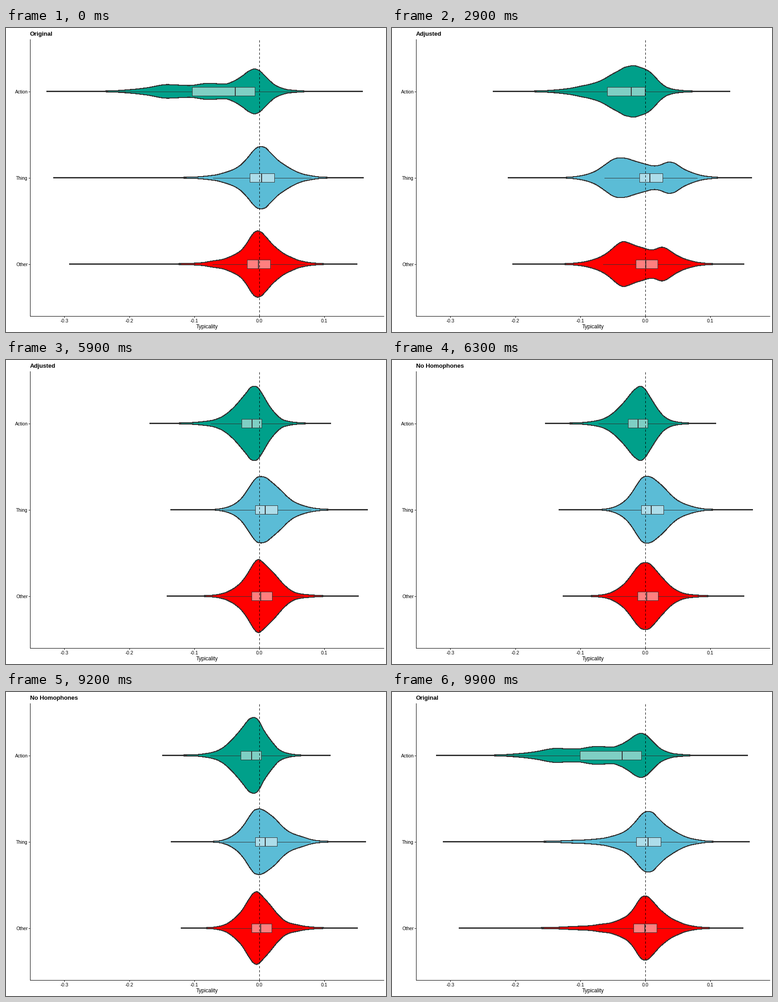
A matplotlib script that plays this animation: 837x669 px, repeating every 10000 ms.

```python
import numpy as np
import matplotlib.pyplot as plt
from matplotlib.animation import FuncAnimation
from matplotlib.patches import Polygon, Rectangle

W, H, DPI = 837, 669, 64           # a power of two keeps the pixel size exact
PX = 72 / DPI                      # one pixel in points
FRAMES, STEP_MS = 100, 100
MORPH = 9                          # steps per transition
ZERO = 557.5                       # x pixel of typicality 0
UNIT = 1432                        # pixels per unit of typicality
LEFT, RIGHT, TOP, BOTTOM = 53, 832, 24, 633
GREY = "#333333"

GROUPS = [("Action", 139, "#00A08A"), ("Thing", 329, "#5BBCD6"), ("Other", 519, "#FF0000")]
TITLES = ["Original", "Adjusted", "No Homophones"]

# Per group: (q1, median, q3) and knots (x, half width) of the density, in pixels
ORIGINAL = [
    ((410, 505, 548),
     [(89, 0), (180, .4), (230, 1.2), (280, 4.5), (310, 8), (355, 15), (403, 13), (443, 17.5),
      (483, 16.5), (500, 22), (520, 34), (535, 45), (547, 49.5), (557, 46), (570, 34),
      (580, 24), (592, 14), (605, 8), (622, 3.5), (672, .5), (785, 0)]),
    ((537, 563, 591),
     [(104, 0), (342, .5), (405, 1.2), (457, 5.5), (480, 11), (500, 18), (515, 27), (530, 42),
      (548, 63), (555, 67.5), (562, 68.5), (571, 66), (580, 57), (600, 37.5),
      (615, 27), (630, 18), (645, 11), (660, 6.5), (697, 1.3), (730, .5), (787, 0)]),
    ((531, 556, 582),
     [(139, 0), (345, .5), (400, 1.4), (430, 3), (455, 7), (475, 10), (490, 15), (512, 26),
      (520, 33), (530, 46), (540, 62), (547, 70), (554, 73), (562, 70), (570, 62), (590, 40),
      (615, 21), (630, 14), (645, 8), (675, 2.5), (704, .8), (773, 0)]),
]
ADJUSTED = [
    ((518, 541, 563),
     [(315, 0), (355, .5), (400, 1.5), (450, 6), (470, 12), (485, 21), (500, 34),
      (522, 59), (530, 69), (537, 78), (543, 81.5), (549, 82), (555, 78), (562, 68),
      (580, 38), (590, 25), (600, 14.5), (612, 7), (640, 2), (674, .5), (715, 0)]),
    ((549, 571, 598),
     [(362, 0), (452, .5), (470, 2), (485, 5), (500, 11), (515, 22), (525, 34), (535, 49),
      (550, 69), (556, 72.5), (562, 73), (572, 70.5), (582, 63), (607, 41),
      (620, 28), (635, 17), (650, 10.5), (675, 4), (700, 1.3), (730, .5), (796, 0)]),
    ((540, 561, 586),
     [(353, 0), (400, .5), (440, 1), (460, 2.5), (480, 6.5), (495, 13), (510, 23), (520, 33),
      (530, 47), (545, 72), (551, 79), (556, 81), (562, 77), (580, 60), (590, 50),
      (612, 25), (625, 14), (637, 7.5), (655, 4), (704, .8), (776, 0)]),
]
NO_HOMOPHONES = [
    ((520, 542, 562),
     [(352, 0), (366, .5), (420, 1.4), (445, 4), (465, 8.5), (480, 16), (495, 29),
      (515, 52), (525, 65), (533, 76), (540, 83), (548, 85.5), (554, 83), (560, 75), (570, 55),
      (580, 39), (590, 25), (602, 12), (615, 6), (635, 2), (661, .5), (712, 0)]),
    ((549, 571, 597),
     [(371, 0), (450, .5), (475, 2), (490, 6), (502, 12), (515, 22), (527, 36),
      (545, 64), (552, 72), (562, 74.5), (572, 71), (582, 64), (595, 53), (615, 31),
      (630, 19.5), (645, 12.5), (660, 7.5), (675, 3.5), (690, 1.5), (724, .5), (792, 0)]),
    ((541, 561, 585),
     [(393, 0), (428, .5), (455, 1.3), (475, 4), (490, 9), (502, 17), (512, 26), (522, 37),
      (541, 68), (548, 78), (556, 82.5), (563, 78), (572, 68), (583, 55),
      (605, 27), (618, 15), (630, 9), (645, 5), (660, 2.7), (690, 1), (718, .5), (774, 0)]),
]


def monotone(x, y, q):
    """Monotone cubic through the knots (x, y), evaluated at q."""
    h = np.diff(x)
    d = np.diff(y) / h
    prod, total = d[:-1] * d[1:], d[:-1] + d[1:]
    same = prod > 0
    m = np.zeros(len(x))
    m[1:-1] = np.where(same, 2 * prod / np.where(same, total, 1), 0)
    i = np.clip(np.searchsorted(x, q) - 1, 0, len(h) - 1)
    t = (q - x[i]) / h[i]
    return ((1 + 2 * t) * (1 - t) ** 2 * y[i] + t * (1 - t) ** 2 * h[i] * m[i]
            + t * t * (3 - 2 * t) * y[i + 1] + t * t * (t - 1) * h[i] * m[i + 1])


def shape(box, knots):
    """Density sampled evenly over its range, plus the five box plot values."""
    kx, kw = np.array(knots, float).T
    x = np.linspace(kx[0], kx[-1], 512)
    q1, mid, q3 = box
    reach = 1.5 * (q3 - q1)
    five = np.array([max(q1 - reach, kx[0]), q1, mid, q3, min(q3 + reach, kx[-1])])
    return x, monotone(kx, kw, x), five


STATES = [[shape(*g) for g in s] for s in (ORIGINAL, ADJUSTED, NO_HOMOPHONES)]
STARTS = [24, 58, 91]              # last still step of each state


def phase(k):
    """State to leave, state to reach and progress at step k."""
    for s, start in enumerate(STARTS):
        if k <= start:
            return s, s, 0.0
        if k < start + MORPH:
            return s, (s + 1) % 3, (k - start) / MORPH
    return 0, 0, 0.0


plt.rcParams["font.family"] = "Liberation Sans"
fig = plt.figure(figsize=(W / DPI, H / DPI), dpi=DPI, facecolor="white")
ax = fig.add_axes([0, 0, 1, 1])
ax.set(xlim=(-.5, W - .5), ylim=(H - .5, -.5))
ax.axis("off")


def line(xs, ys, color="black", width=1, **kw):
    return ax.plot(xs, ys, color=color, lw=width * PX, antialiased=False,
                   solid_capstyle="butt", **kw)[0]


def label(x, y, s, size, **kw):
    return ax.text(x, y, s, fontsize=size * PX, va="baseline", **kw)


class Violin:
    def __init__(self, y, color, z):
        self.y = y
        self.body = ax.add_patch(Polygon([(0, 0), (1, 1)], fc=color, ec=GREY, lw=1.1 * PX,
                                         antialiased=False, zorder=z))
        self.whisker = line([], [], GREY, zorder=z + .1)
        self.box = ax.add_patch(Rectangle((0, y - 10), 1, 19, fc=(1, 1, 1, .5), ec=GREY,
                                          lw=PX, antialiased=False, zorder=z + .2))
        self.median = line([], [], GREY, 2, zorder=z + .3)

    def update(self, a, b, e):
        x, w, five = (p + (q - p) * e for p, q in zip(a, b))
        self.body.set_xy(np.column_stack([np.r_[x, x[::-1]],
                                          np.r_[self.y - w, self.y + w[::-1]]]))
        lo, q1, mid, q3, hi = five
        self.whisker.set_data([lo, q1, np.nan, q3, hi], [self.y] * 5)
        self.box.set_x(q1)
        self.box.set_width(q3 - q1)
        self.median.set_data([mid, mid], [self.y - 10, self.y + 9])


violins = [Violin(y, c, 3 + i) for i, (_, y, c) in enumerate(GROUPS)]

line([ZERO, ZERO], [BOTTOM, TOP], zorder=8, dashes=(4, 4), dash_capstyle="butt")
line([LEFT, LEFT], [TOP, BOTTOM], zorder=9)
line([LEFT, RIGHT], [BOTTOM, BOTTOM], zorder=9)
for name, y, _ in GROUPS:
    line([LEFT - 3, LEFT], [y, y], zorder=9)
    label(47.5, y + 4.5, name, 10.3, ha="right")
for v in (-.3, -.2, -.1, 0, .1):
    x = ZERO + v * UNIT
    line([x, x], [BOTTOM, BOTTOM + 3], zorder=9)
    label(x, 647.5, f"{v:.1f}", 10.5, ha="center")
label(442, 661, "Typicality", 11.7, ha="center")
title = label(52.5, 16.5, "", 13.3, ha="left", weight="bold")


def draw(k):
    a, b, t = phase(k)
    e = (1 - np.cos(np.pi * t)) / 2
    title.set_text(TITLES[a if t < .5 else b])
    for v, p, q in zip(violins, STATES[a], STATES[b]):
        v.update(p, q, e)
    return []


def reset():
    return draw(0)


anim = FuncAnimation(fig, draw, frames=FRAMES, init_func=reset, interval=STEP_MS,
                     repeat=True, repeat_delay=0, blit=False)
plt.show()
```
